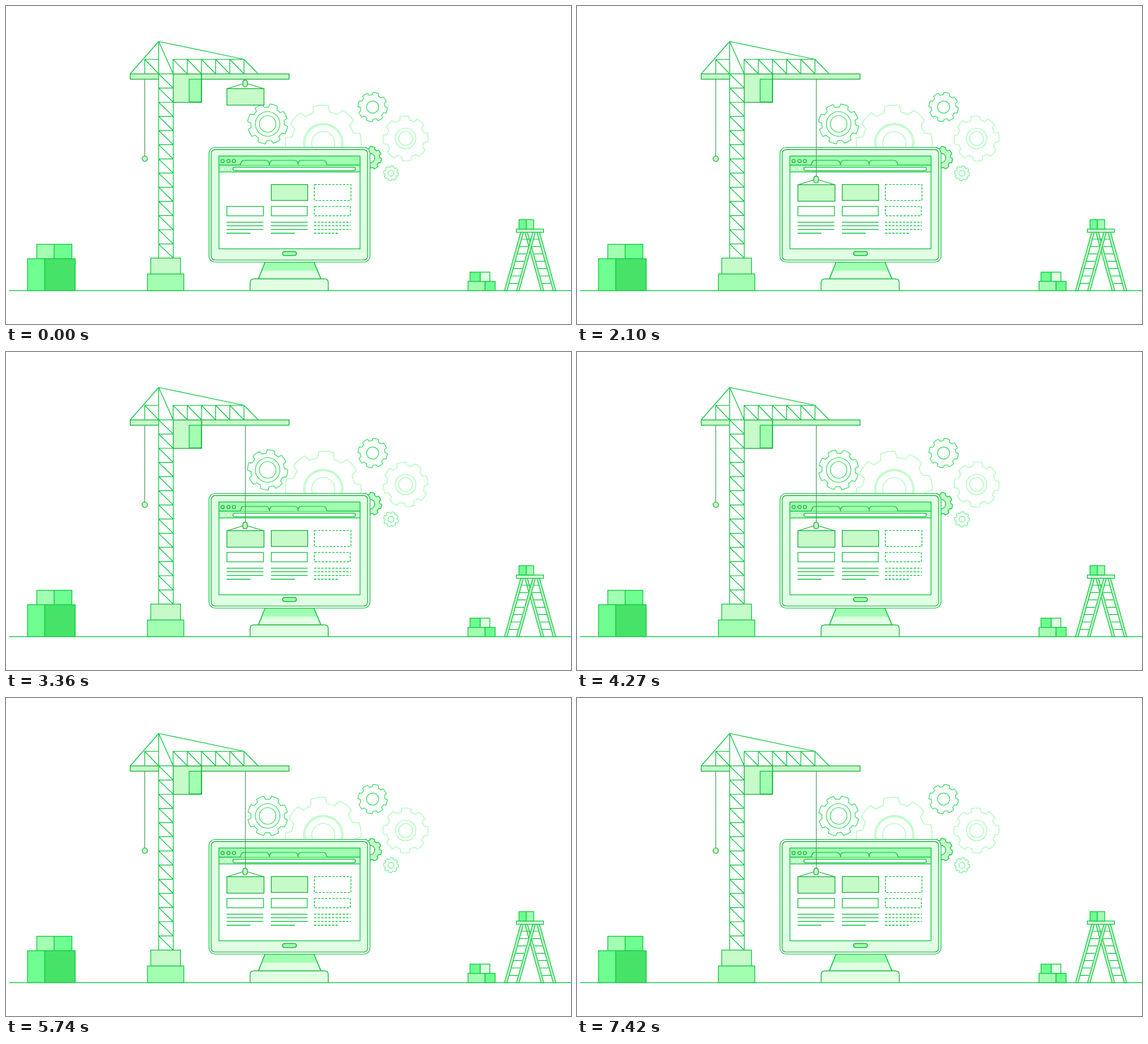
Animation, 853 px wide and 480 px high, one loop 7.49 s. Source, as an HTML page:

```html
<!DOCTYPE html>
<html lang="en">
<head>
<meta charset="utf-8">
<title>Under construction</title>
<style>
  html, body { margin: 0; width: 100%; height: 100%; overflow: hidden; background: #fff; }
  svg { display: block; width: 853px; height: 480px; }
</style>
</head>
<body>
<svg id="stage" viewBox="0 0 853 480" fill="none" stroke-width="1.2"></svg>
<script>
const LOOP = 7490, STEP = 70;
const LINE = '#14c846', DARK = '#1bb33d', ROPE = '#4c9560';
const PALE = '#e0ffe3', SOFT = '#c6fac9', MINT = '#a2ffb1', BRIGHT = '#6eff90', DEEP = '#46e368';
const stage = document.getElementById('stage');

function add(tag, attrs, parent = stage) {
  const node = document.createElementNS('http://www.w3.org/2000/svg', tag);
  for (const key in attrs) node.setAttribute(key, attrs[key]);
  parent.appendChild(node);
  return node;
}
// Boxes are given by their left, top, right and bottom edges.
function box(x1, y1, x2, y2, fill = 'none', more = {}, parent = stage) {
  return add('rect', { x: x1, y: y1, width: x2 - x1, height: y2 - y1, fill, stroke: LINE, ...more }, parent);
}
function path(d, more = {}, parent = stage) {
  return add('path', { d, stroke: LINE, ...more }, parent);
}
function ring(cx, cy, r, more = {}, parent = stage) {
  return add('circle', { cx, cy, r, stroke: LINE, ...more }, parent);
}

function gearOutline(r, teeth = 8) {
  const root = r * 0.835, pitch = 360 / teeth;
  const at = (radius, deg) => {
    const a = deg * Math.PI / 180;
    return `${(radius * Math.sin(a)).toFixed(2)} ${(-radius * Math.cos(a)).toFixed(2)}`;
  };
  let d = '';
  for (let i = 0; i < teeth; i++) {
    const mid = i * pitch, foot = pitch * 0.335, tip = pitch * 0.25;
    d += i ? `A${root} ${root} 0 0 1 ` : 'M';
    d += `${at(root, mid - foot)}L${at(r, mid - tip)}A${r} ${r} 0 0 1 ${at(r, mid + tip)}L${at(root, mid + foot)}`;
  }
  return d + `A${root} ${root} 0 0 1 ${at(root, -pitch * 0.335)}Z`;
}

const gears = [];
function gear(x, y, r, phase, turn, stroke, rings, fill = 'none') {
  const group = add('g', { transform: `translate(${x} ${y})`, stroke });
  const rim = add('path', { d: gearOutline(r), fill, 'stroke-linejoin': 'round' }, group);
  rings.forEach(radius => ring(0, 0, radius, { stroke, fill: fill === 'none' ? 'none' : '#fff' }, group));
  gears.push({ rim, phase, turn });
}

function drawGears() {
  gear(479, 207, 57.3, -3.5, 1, '#a9fbb7', [29.7, 27.8, 17.5]);
  gear(395, 178, 30.3, 18, -1, '#41dc69', [18.5, 12.5]);
  gear(553.5, 152.5, 22.2, 13, 0, '#41dc69', [9.2]);
  gear(603.3, 200, 34, -3, -1, '#a9fbb7', [15.5, 10.5]);
  gear(581.3, 252.5, 11.3, 10, 1, '#7df299', [4.4]);
  gear(549.5, 229.5, 17.6, 13, 0, LINE, [7.2], SOFT);
}

function drawCrane() {
  box(187.5, 102.5, 427.3, 110.5, SOFT, { stroke: DARK });
  box(230.5, 102.5, 252.5, 380.5, '#fff');
  let d = '';
  const cell = 278 / 13;
  for (let i = 0; i < 13; i++) {
    const y = 102.5 + i * cell;
    d += `M230.5 ${y}H252.5M230.5 ${y}L252.5 ${y + cell}`;
  }
  for (let i = 0; i < 6; i++) {
    const x = 252.3 + i * 21.4;
    d += `M${x} 102.5V80.5L${x + 21.4} 102.5`;
  }
  d += 'M252.3 80.5H359.5L230.5 53.5L187.5 102.5M230.5 102.5V53.5L252.5 102.5';
  d += 'M230.5 80.5H209.5V102.5M209.5 80.5L230.5 102.5';
  path(d, { 'stroke-linejoin': 'round' });
  box(252.5, 102.7, 295.3, 145.5, SOFT, { stroke: DARK });
  box(276.5, 110.5, 295, 144.8, MINT);
  path('M295.3 102.7V145.5', { stroke: DARK });
  box(218.5, 380.5, 263.5, 404.5, SOFT);
  box(213.5, 404.5, 268.5, 429.5, MINT);
  path('M209.5 110.5V226.5', { stroke: ROPE, 'stroke-width': 1 });
  ring(209.5, 230.5, 4, { fill: SOFT, stroke: DARK });
}

function drawMonitor() {
  path('M391 387H465L475.5 412H381Z', { fill: PALE });
  path('M391 387.5H465L469.5 399.5H386.5Z', { fill: MINT, stroke: 'none' });
  path('M391 387L381 412M465 387L475.5 412');
  path('M368.5 429.5V417.5Q368.5 411.8 374.5 411.8H480.5Q486.5 411.8 486.5 417.5V429.5Z', { fill: PALE, stroke: DARK });
  box(306.5, 213.5, 549.5, 386.5, '#fff', { rx: 9 });
  box(309.7, 216.7, 546, 383.5, PALE, { rx: 6, stroke: DARK });
  box(321.5, 226.5, 534.5, 366.5, '#fff');
  box(321.5, 226.5, 534.5, 240.3, MINT);
  box(321.5, 240.3, 534.5, 250.5, SOFT);
  for (const x of [440, 397, 353.5])
    path(`M${x} 240.3L${x + 1.5} 236Q${x + 2.5} 233 ${x + 6} 233H${x + 38}Q${x + 42} 233 ${x + 43.3} 236L${x + 44.5} 240.3`,
      { fill: MINT, stroke: x < 360 ? DARK : LINE });
  for (const x of [327, 336, 344]) ring(x, 234, 2.5, { stroke: DARK });
  for (const x of [327, 336]) ring(x, 245.8, 3, { fill: PALE, stroke: MINT });
  box(342.5, 243.3, 527.5, 248.7, '#fff', { rx: 2.7 });
  box(417.5, 370.6, 438.5, 376.6, MINT, { rx: 3, stroke: DARK });
}

function drawPage() {
  const dash = { 'stroke-dasharray': '3.6 1.8' };
  box(400.5, 269.5, 455.5, 293.5, SOFT, { stroke: DARK });
  box(465.5, 269.5, 520.8, 293.5, 'none', dash);
  [333.5, 400.5, 465.5].forEach((x, i) => {
    const style = i === 2 ? dash : {};
    box(x, 302.5, x + (i ? 54.3 : 55.2), 316.7, 'none', style);
    path(`M${x - .5} 326.4h55.5m-55.5 5.2h55.5m-55.5 5.7h55.5`, style);
    path(`M${x - .5} 343h36`, { ...style, 'stroke-width': 1.7 });
  });
}

function drawBoxes() {
  box(46.5, 359.7, 72.7, 381.5, MINT);
  box(72.7, 359.7, 99.5, 381.5, BRIGHT);
  box(32.5, 381.5, 58.5, 429.5, BRIGHT);
  box(58.5, 381.5, 104.5, 429.5, DEEP);
  box(700.5, 401.7, 716, 415.7, BRIGHT);
  box(716, 401.7, 730.5, 415.7, PALE);
  box(697.5, 415.7, 723.3, 429.5, MINT);
  box(723.3, 415.7, 738.5, 429.5, BRIGHT);
}

function drawLadder() {
  const top = 341.5, ground = 429.7, middle = 791.3;
  const half = side => {
    const group = add('g', { transform: `translate(${middle} 0) scale(${side} 1)` });
    let rungs = '';
    for (let i = 0; i < 7; i++) {
      const y = 352 + i * 11.1, shift = (y - top) * 0.277;
      rungs += `M${-11 - shift} ${y}H${3 - shift}`;
    }
    path(rungs, {}, group);
    for (const x of [-14.2, 4])
      path(`M${x} ${top}L${x - 24.5} ${ground}h3.8L${x + 4} ${top}Z`, { fill: SOFT }, group);
  };
  half(-1);
  half(1);
  box(770.5, 336.7, 811.5, 341.5, PALE);
  box(774.5, 322.5, 785.5, 336.7, BRIGHT);
  box(785.5, 322.5, 796.7, 336.7, MINT);
}

drawGears();
drawCrane();
drawMonitor();
drawPage();
drawBoxes();
drawLadder();
path('M4.5 429.7H853');

const rope = path('', { stroke: ROPE, 'stroke-width': 1 });
const load = add('g', {});
box(333.5, 124.7, 389.5, 149.6, SOFT, { stroke: DARK }, load);
path('M334 124.7L358 117.2M364 117.2L389 124.7', { stroke: DARK }, load);
box(357.6, 111.8, 364.4, 121.8, SOFT, { rx: 3.4, stroke: DARK }, load);

function ease(time, start, duration) {
  const x = Math.min(1, Math.max(0, (time - start) / duration));
  return x * x * (3 - 2 * x);
}

function render(time) {
  const drop = 145 * ease(time, 72, 1855);
  load.setAttribute('transform', `translate(0 ${drop})`);
  rope.setAttribute('d', `M361.3 110.5V${111.8 + drop}`);
  const angle = 360 * ease(time, 1990, 5650);
  for (const { rim, phase, turn } of gears)
    rim.setAttribute('transform', `rotate(${phase + turn * angle})`);
}

const begin = performance.now();
function tick() {
  const time = (performance.now() - begin) % LOOP;
  render(Math.floor(time / STEP) * STEP);
  requestAnimationFrame(tick);
}
tick();
</script>
</body>
</html>
```
